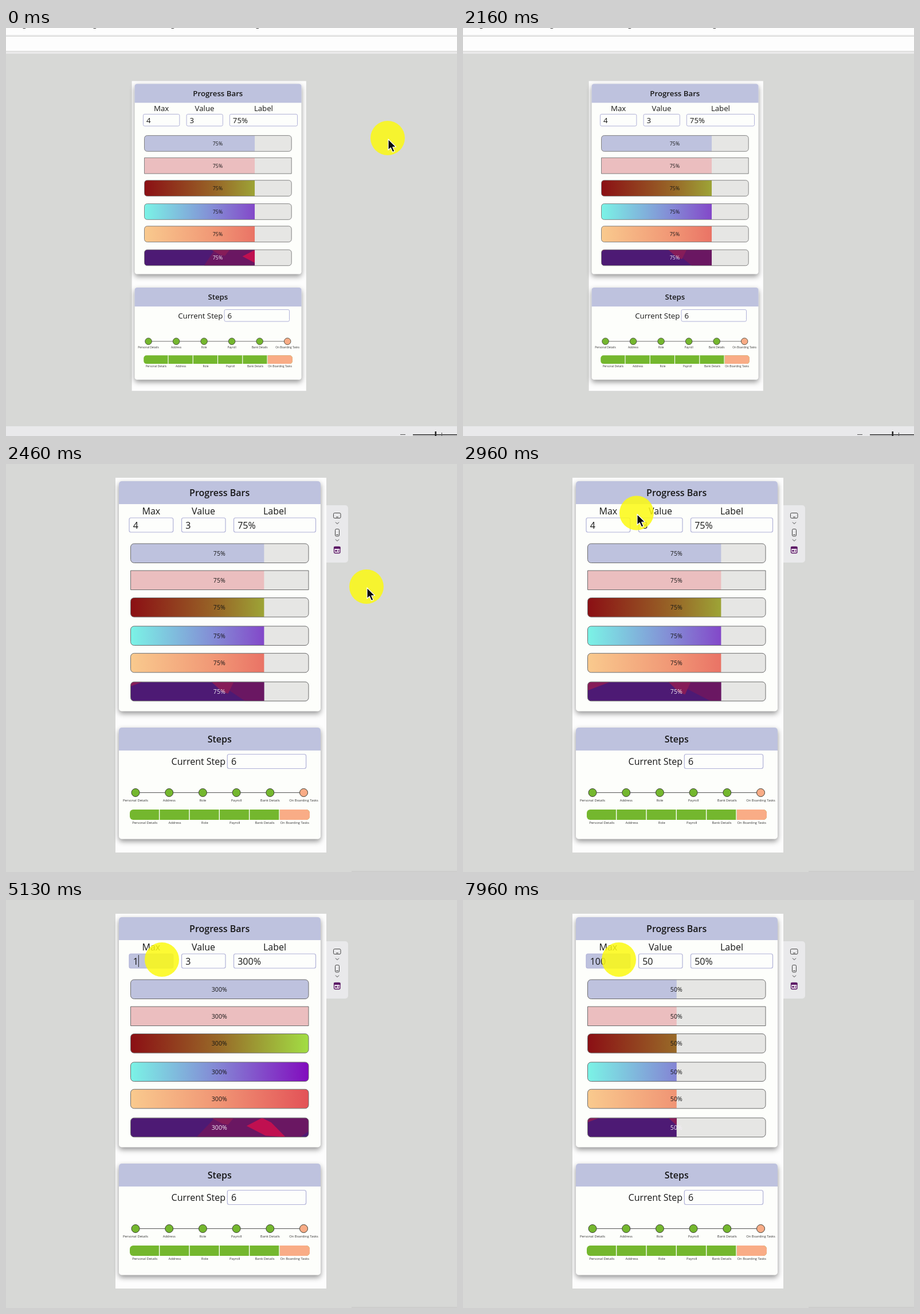
Write an HTML page with a canvas that moves like this. It is 787 px wide and 712 px high and loops after 8 s.

```html
<!DOCTYPE html>
<html lang="en">
<head>
<meta charset="utf-8">
<title>Progress bars and steps</title>
<style>
html, body { margin: 0; width: 100%; height: 100%; overflow: hidden; background: #d7d8d6; }
canvas { display: block; }
</style>
</head>
<body>
<canvas id="stage" width="787" height="712"></canvas>
<script>
const ctx = document.getElementById('stage').getContext('2d');
const LOOP = 8000, ZOOM_AT = 2330, TYPE_AT = 5000, WAVE_PERIOD = 5500;
const LAVENDER = '#bec2de', INK = '#161616', GREEN = '#74b72e', SALMON = '#f9ac86';
const ICON = '#444', PLUM = '#5c1a66', CRIMSON = '#c01050', WINE = '#861c59';
const STEPS = ['Personal Details', 'Address', 'Role', 'Payroll', 'Bank Details', 'On Boarding Tasks'];
const BAR = { x: 217.5, w: 310.5, h: 33.5 };
const BARS = [
  { y: 139, stops: [LAVENDER] },
  { y: 186, stops: ['#ebbebf'], square: true },
  { y: 233.5, stops: ['#8b0f14', '#986a28', '#a2de44'] },
  { y: 283, stops: ['#7bf3e6', '#8484d4', '#820cbe'] },
  { y: 330.3, stops: ['#f9ca8e', '#f09474', '#e35257'] },
  { y: 380.2, wave: true }
];

const mix = (a, b, u) => a + (b - a) * u;
const progress = (t, from, to) => Math.min(1, Math.max(0, (t - from) / (to - from)));
const ease = u => u * u * (3 - 2 * u);
const arc = u => Math.sin(Math.PI * u);

function rect(x, y, w, h, fill) {
  ctx.fillStyle = fill;
  ctx.fillRect(x, y, w, h);
}

function box(x, y, w, h, radius, fill, stroke, width = 1) {
  ctx.beginPath();
  ctx.roundRect(x, y, w, h, radius);
  if (fill) { ctx.fillStyle = fill; ctx.fill(); }
  if (stroke) { ctx.strokeStyle = stroke; ctx.lineWidth = width; ctx.stroke(); }
}

function circle(x, y, r, fill, stroke) {
  ctx.beginPath();
  ctx.arc(x, y, r, 0, 2 * Math.PI);
  ctx.fillStyle = fill;
  ctx.fill();
  if (stroke) { ctx.strokeStyle = stroke; ctx.lineWidth = 1; ctx.stroke(); }
}

function text(str, x, y, size = 16, align = 'center', color = INK, weight = 400) {
  ctx.font = `${weight} ${size}px "Open Sans", sans-serif`;
  ctx.textAlign = align;
  ctx.fillStyle = color;
  ctx.fillText(str, x, y);
}

function trace(points) {
  ctx.beginPath();
  for (let i = 0; i < points.length; i += 2) ctx.lineTo(points[i], points[i + 1]);
}

function polygon(fill, ...points) {
  trace(points);
  ctx.closePath();
  ctx.fillStyle = fill;
  ctx.fill();
}

function line(color, width, ...points) {
  trace(points);
  ctx.strokeStyle = color;
  ctx.lineWidth = width;
  ctx.stroke();
}

function card(y, h, title) {
  ctx.save();
  ctx.shadowColor = 'rgba(0,0,0,.42)';
  ctx.shadowBlur = 10;
  ctx.shadowOffsetY = 4;
  box(197, y, 352, h, 5, '#fdfefb');
  ctx.restore();
  box(197, y, 352, 40, [5, 5, 0, 0], LAVENDER);
  text(title, 372.7, y + 26, 16, 'center', INK, 600);
}

function field(x, y, w, value, { hover, caret, selected } = {}) {
  box(x, y, w, 25, 3, hover ? LAVENDER : '#fdfefc', '#b0b1d8', 1.2);
  const left = x + 6.7;
  ctx.font = '16px "Open Sans", sans-serif';
  const width = ctx.measureText(value).width;
  if (selected) rect(left, y + 1.5, width, 22, '#0078d7');
  text(value, left, y + 18.7, 16, 'left', selected ? '#fff' : INK);
  if (caret) rect(left + width, y + 2, 1, 21, '#222');
}

// An edge sweeps right and swings over while a bright sliver accelerates out of view.
function drawWave(t) {
  const { w, h } = BAR;
  const u = (t / WAVE_PERIOD + .46) % 1;
  const bottom = mix(50, 215, u), top = 150 - 70 * Math.exp(-8 * u);
  const tip = mix(5, 22, u), corner = Math.max(0, u - .81) * 210;
  const x = 190 + 80 * u * u;
  rect(0, 0, w, h, '#4d1a74');
  polygon('#6a1762', bottom, h, top, 0, w, 0, w, h * .7, w - 14, h);
  polygon(WINE, 141, 0, 160, tip * .85, 170, tip, 180, 0);
  polygon(CRIMSON, x, 14, x + 27, 0, x + 43, 8, x + 68, h, x + 33, 31);
  polygon(WINE, 0, 0, corner, 0, 0, corner * .38);
}

function progressBar({ y, stops, square, wave }, ratio, label, t) {
  const { x, w, h } = BAR, radius = square ? 0 : 6;
  box(x, y, w, h, radius, '#e6e6e4');
  ctx.save();
  ctx.clip();
  ctx.translate(x, y);
  ctx.beginPath();
  ctx.rect(0, 0, w * ratio, h);
  ctx.clip();
  if (wave) drawWave(t);
  else {
    const gradient = ctx.createLinearGradient(0, 0, w, 0);
    stops.forEach((c, i) => gradient.addColorStop(i / Math.max(1, stops.length - 1), c));
    rect(0, 0, w, h, gradient);
  }
  ctx.restore();
  box(x, y, w, h, radius, null, '#6c6c6c');
  text(label, 372.3, y + 20.8, 10.67, 'center', wave ? '#f3edf5' : INK);
}

function drawSteps() {
  card(460, 194.5, 'Steps');
  text('Current Step', 383, 525, 16, 'right');
  field(386.3, 506.5, 137.3, '6');
  line('#555', 1, 226, 573.5, 519.5, 573.5);
  const segment = 314 / STEPS.length, last = STEPS.length - 1;
  box(216, 603, 314, 18, 6, GREEN);
  box(216 + last * segment, 603, segment, 18, [0, 6, 6, 0], SALMON);
  STEPS.forEach((name, i) => {
    const x = 226 + i * 58.7, left = 216 + i * segment;
    circle(x, 573.5, 7, i < last ? GREEN : SALMON, '#3b3f36');
    text(name, x, 588.6, 5.87, 'center', '#333');
    if (i) rect(left - 1.4, 603, 1.4, 18, '#fdfefb');
    text(name, left + segment / 2, 628.2, 5.87, 'center', '#333');
  });
}

function drawPage(t, hover) {
  const max = t < TYPE_AT ? 4 : t < 5160 ? 1 : t < 5260 ? 10 : 100;
  const value = t < 6930 ? 3 : t < 7060 ? 5 : 50;
  const label = Math.round(value / max * 100) + '%';
  const during = (from, to) => t >= from && t < to;
  rect(191, 24, 368, 654, '#fdfdfd');
  card(30, 401.5, 'Progress Bars');
  text('Max', 253.3, 88);
  text('Value', 344.5, 88);
  text('Label', 469, 88);
  field(215, 94, 76.7, String(max), { hover, caret: during(TYPE_AT, 5760), selected: during(4100, TYPE_AT) });
  field(306.5, 94, 76.5, String(value), { caret: during(6930, 7560), selected: during(5930, 6930) });
  field(397.5, 94, 143, label);
  BARS.forEach(bar => progressBar(bar, Math.min(1, value / max), label, t));
  drawSteps();
}

function drawWindowEdges() {
  rect(0, 0, 787, 45, '#e9e9e9');
  rect(0, 0, 787, 12, '#fdfdfd');
  rect(0, 15, 787, 25, '#fdfdfd');
  for (const y of [14, 40]) rect(0, y, 787, 1, '#d4d4d3');
  for (const x of [32, 155, 291, 439]) text('g', x, -2, 12);
  rect(0, 695, 787, 17, '#e9e9eb');
  rect(688, 709, 9, 1, '#555');
  rect(710, 709, 77, 1.6, '#333');
  rect(748.5, 704, 2.5, 8, '#222');
  rect(760, 706, 1, 6, '#555');
}

function drawSidebar() {
  box(559, 72, 38, 100, [0, 5, 5, 0], '#e9e9eb');
  box(571.5, 85.5, 12.5, 9, 2, null, ICON);
  box(574.5, 113.5, 7, 12.5, 2, null, ICON);
  for (const y of [92.5, 123.5]) line(ICON, 1, 576, y, 580, y);
  for (const y of [101.5, 131.5]) line(ICON, 1, 575, y, 578, y + 3, 581, y);
  box(572.5, 144.5, 10.5, 11, 2, '#efe6f1', PLUM, 1.3);
  rect(572, 144.5, 11.5, 3.5, PLUM);
  rect(574.5, 150, 3, 3, PLUM);
  for (const y of [150, 152]) rect(579, y, 2.5, 1, PLUM);
  rect(603, 710, 184, 2, '#cdcdcc');
}

function pointerAt(t) {
  if (t < ZOOM_AT) {
    const u = progress(t, 60, 800);
    return [mix(666, 830, u), mix(192, 214, u)];
  }
  const glide = ease(progress(t, 2600, 3400)), nudge = progress(t, 3460, 4100);
  return [
    mix(629, 276, glide) - 180 * arc(glide) - 4 * nudge,
    mix(214, 107, glide) - 85 * arc(glide) - 3 * nudge - 12 * arc(nudge)
  ];
}

function drawPointer(x, y, overField) {
  ctx.save();
  ctx.lineJoin = 'round';
  if (overField) {
    ctx.translate(x + .5, y + .5);
    for (const [color, width] of [['#fff', 4], ['#111', 2]]) {
      line(color, width, 0, -9, 0, 9);
      line(color, width, -2.5, 1, 2.5, 1);
      for (const s of [-1, 1]) line(color, width, -4.5, 10.5 * s, -2, 10.5 * s, 0, 9 * s, 2, 10.5 * s, 4.5, 10.5 * s);
    }
  } else {
    ctx.translate(x + 1, y + 2);
    polygon('#0a0a0a', 0, 0, 0, 19, 4.3, 15, 7.6, 22.5, 11, 21, 7.8, 13.8, 13.5, 13.5);
    ctx.strokeStyle = '#fff';
    ctx.lineWidth = 1.2;
    ctx.stroke();
  }
  ctx.restore();
}

function draw(t) {
  const zoomed = t >= ZOOM_AT;
  const [x, y] = pointerAt(t);
  const hover = zoomed && x >= 215 && x <= 292 && y >= 92 && y <= 119;
  rect(0, 0, 787, 712, '#d7d8d6');
  ctx.save();
  if (!zoomed) {
    ctx.translate(61.7, 72.7);
    ctx.scale(.8267, .8267);
  }
  drawPage(t, hover);
  ctx.restore();
  if (zoomed) drawSidebar();
  else drawWindowEdges();
  circle(x, y, 30, 'rgba(252,250,18,.85)');
  if (t < TYPE_AT) drawPointer(x, y, hover);
}

const start = performance.now();
function tick() {
  draw((performance.now() - start) % LOOP);
  requestAnimationFrame(tick);
}
tick();
</script>
</body>
</html>
```
